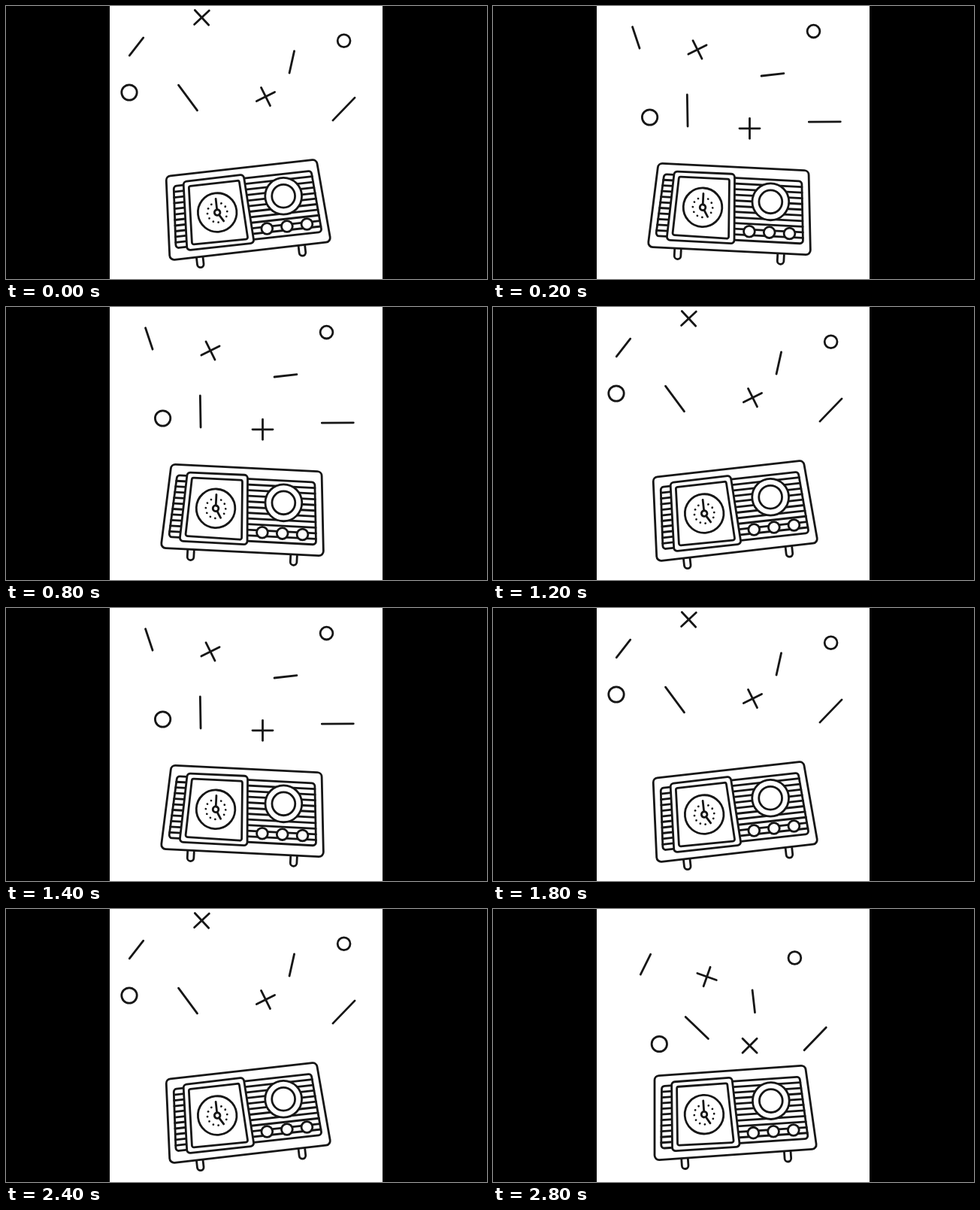
These frames come from a looping animation (640x363 px, 3000 ms). An HTML page with a canvas:

```html
<!DOCTYPE html>
<html lang="en">
<head>
<meta charset="utf-8">
<title>Dancing radio</title>
<style>
  html, body { margin: 0; width: 100%; height: 100%; overflow: hidden; background: #000; }
  canvas { display: block; }
</style>
</head>
<body>
<canvas id="stage" width="640" height="363"></canvas>
<script>
const ctx = document.getElementById('stage').getContext('2d');
const INK = '#161616';
const POSE_MS = 200;

// body: corners clockwise from top left; bars and crosses: x, y, degrees; rings: x, y.
const poses = [
  {
    body: [[213, 226.5], [413, 204], [432.3, 313.5], [218, 338]],
    shortBars: [[173.5, 54, 128], [380.3, 74.5, 102.5]],
    longBars: [[242, 122, 53.5], [449.5, 137, 134]],
    crosses: [[260.5, 15.3, -43], [345.5, 120.5, -26.5]],
    rings: [[449.6, 46.3], [164, 115]]
  },
  {
    body: [[220, 209.2], [420, 219], [422.5, 331], [206, 320.3]],
    shortBars: [[190.3, 42, 71.5], [372, 91.3, -6.5]],
    longBars: [[258.7, 139, 89], [441.3, 154, -0.6]],
    crosses: [[272, 58, -26.5], [341.5, 162.8, 0]],
    rings: [[426.5, 33.6], [208.6, 148]]
  },
  {
    body: [[215, 222], [415.3, 208], [431, 319], [215, 334]],
    shortBars: [[203, 73.6, 116.5], [346.8, 122.8, 83.5]],
    longBars: [[271.3, 158, 44], [428.7, 172.7, 134]],
    crosses: [[284.6, 90, 19.5], [341.6, 181.8, 45]],
    rings: [[401.4, 65], [221.3, 179.5]]
  }
];

const grille = [[.047, .127], [.953, .13], [.955, .87], [.041, .865]];
const door = [[.112, .086], [.51, .083], [.529, .91], [.11, .907]];
const glass = [[.146, .147], [.477, .147], [.493, .855], [.143, .843]];

const lerp = (a, b, t) => a + (b - a) * t;
const mix = (p, q, t) => [lerp(p[0], q[0], t), lerp(p[1], q[1], t)];

function line(p, q) {
  ctx.beginPath();
  ctx.moveTo(...p);
  ctx.lineTo(...q);
  ctx.stroke();
}

function bar([x, y, degrees], length) {
  const a = degrees * Math.PI / 180;
  const dx = Math.cos(a) * length / 2, dy = Math.sin(a) * length / 2;
  line([x - dx, y - dy], [x + dx, y + dy]);
}

function ring([x, y], r) {
  ctx.beginPath();
  ctx.arc(x, y, r, 0, 2 * Math.PI);
  ctx.fill();
  ctx.stroke();
}

function quad(points, radius) {
  ctx.beginPath();
  ctx.moveTo(...mix(points[3], points[0], .5));
  points.forEach((p, i) => ctx.arcTo(...p, ...points[(i + 1) % 4], radius));
  ctx.closePath();
  ctx.fill();
  ctx.stroke();
}

// Runs a drawing in local axes at a point, turned by an angle.
function at([x, y], angle, drawLocal) {
  ctx.save();
  ctx.translate(x, y);
  ctx.rotate(angle);
  drawLocal();
  ctx.restore();
}

function dial() {
  ring([0, 0], 25.8);
  ctx.fillStyle = INK;
  for (let hour = 1; hour < 12; hour++) {
    if (hour === 5) continue;
    const a = hour * Math.PI / 6;
    ctx.beginPath();
    ctx.arc(13.2 * Math.sin(a), -13.2 * Math.cos(a), 1.4, 0, 2 * Math.PI);
    ctx.fill();
  }
  ctx.fillStyle = '#fff';
  line([0, 0], [0, -18.3]);
  line([0, 0], [7.2, 12.2]);
  ring([0, 0], 3.8);
}

function foot() {
  ctx.beginPath();
  ctx.moveTo(-4.3, 0);
  ctx.lineTo(-4.3, 10);
  ctx.arc(0, 10, 4.3, Math.PI, 0, true);
  ctx.lineTo(4.3, 0);
  ctx.stroke();
}

function radio([tl, tr, br, bl]) {
  const place = ([u, v]) => mix(mix(tl, tr, u), mix(bl, br, u), v);
  const panel = (points, radius) => quad(points.map(place), radius);
  const tilt = Math.atan2(tr[1] - tl[1], tr[0] - tl[0]);

  for (const u of [.185, .818]) at(place([u, 1]), tilt, foot);
  quad([tl, tr, br, bl], 6);
  panel(grille, 4);
  for (let i = 1; i < 11; i++) {
    line(place(mix(grille[0], grille[3], i / 11)), place(mix(grille[1], grille[2], i / 11)));
  }
  panel(door, 4.5);
  panel(glass, 2.5);
  at(place([.317, .498]), tilt, dial);

  const speaker = place([.75, .392]);
  ring(speaker, 24.4);
  ring(speaker, 15.4);
  for (const u of [.619, .745, .871]) ring(place([u, .757]), 7.4);
}

function draw(pose) {
  ctx.fillStyle = '#000';
  ctx.fillRect(0, 0, 640, 363);
  ctx.fillStyle = '#fff';
  ctx.fillRect(138, 0, 363, 363);
  ctx.strokeStyle = INK;
  ctx.lineWidth = 2.8;
  ctx.lineCap = ctx.lineJoin = 'round';

  pose.shortBars.forEach(b => bar(b, 30));
  pose.longBars.forEach(b => bar(b, 42));
  for (const [x, y, degrees] of pose.crosses) {
    bar([x, y, degrees], 27);
    bar([x, y, degrees + 90], 27);
  }
  ring(pose.rings[0], 8.4);
  ring(pose.rings[1], 10.2);
  radio(pose.body);
}

const start = performance.now();
function frame() {
  const elapsed = performance.now() - start;
  draw(poses[Math.floor(elapsed / POSE_MS) % poses.length]);
  requestAnimationFrame(frame);
}
frame();
</script>
</body>
</html>
```
